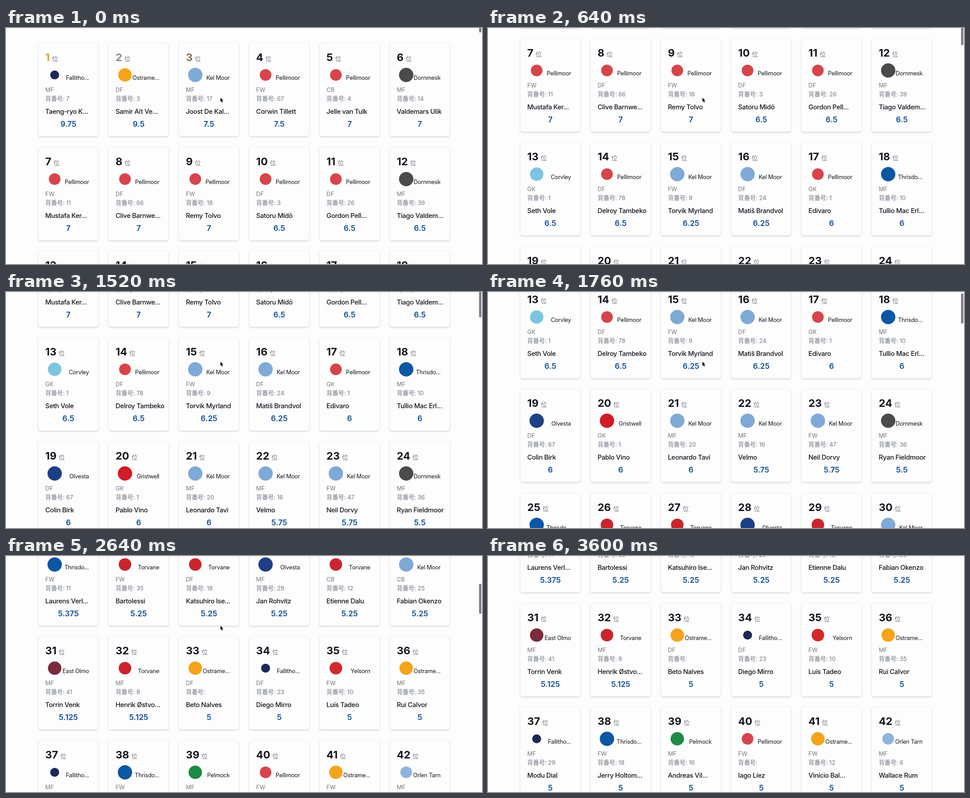
Write an HTML page with a canvas that moves like this. It is 1061 px wide and 528 px high and loops after 3.68 s.

```html
<!DOCTYPE html>
<html lang="ja">
<head>
<meta charset="utf-8">
<title>Player ranking</title>
<style>
html, body { margin: 0; width: 100%; height: 100%; overflow: hidden; background: #fdfdfd; }
canvas { display: block; }
</style>
</head>
<body>
<canvas id="stage" width="1061" height="528"></canvas>
<script>
const ctx = document.getElementById('stage').getContext('2d');
const WIDTH = 1061, HEIGHT = 528, LOOP = 3680, STEP = 80;
const FONT = 'Inter, "Noto Sans CJK JP", "Noto Sans CJK", sans-serif';
const GRAY = '#717784', INK = '#14161f', BLUE = '#245a9c';
const RANK_COLORS = ['#d3a72f', '#8c8c8c', '#8b6f5c'];
const CARD = { left: 72, top: 34, width: 133.5, height: 208, pitchX: 156.7, pitchY: 232.5 };

// key: [label, badge colour, badge radius]
const TEAMS = {
  D: ['Fallitho...', '#1b2a55', 10],
  O: ['Ostrame...', '#f5a31a', 15],
  K: ['Kel Moor', '#7fa9d6', 16],
  P: ['Pellimoor', '#d6454b', 13],
  N: ['Dornmesk', '#4b4a4c', 16],
  C: ['Corvley', '#7cc4e0', 15],
  T: ['Thrisdo...', '#0b57a4', 16],
  V: ['Olvesta', '#1d3f86', 16],
  G: ['Gristwell', '#d01c27', 16],
  A: ['Torvane', '#c9252f', 14],
  E: ['East Olmo', '#7a2b3d', 15],
  Y: ['Yelsorn', '#d22a2b', 14],
  M: ['Pelmock', '#1d8a45', 15],
  L: ['Orlen Tarn', '#8fb3dc', 13]
};

const PLAYERS = `Taeng-ryo K...|D|MF|7|9.75
Samir Aït Ve...|O|DF|3|9.5
Joost De Kal...|K|MF|17|7.5
Corwin Tillett|P|FW|67|7.5
Jelle van Tulk|P|CB|4|7
Valdemars Ulik|N|MF|14|7
Mustafa Ker...|P|FW|11|7
Clive Barnwe...|P|DF|66|7
Remy Tolvo|P|FW|18|7
Satoru Midō|P|DF|3|6.5
Gordon Pell...|P|DF|26|6.5
Tiago Valdem...|N|MF|39|6.5
Seth Vole|C|GK|1|6.5
Delroy Tambeko|P|DF|78|6.5
Torvik Myrland|K|FW|9|6.25
Matiš Brandvol|K|DF|24|6.25
Edivaro|P|GK|1|6
Tullio Mac Erl...|T|MF|10|6
Colin Birk|V|DF|67|6
Pablo Vino|G|GK|1|6
Leonardo Tavi|K|MF|20|6
Velmo|K|MF|16|5.75
Neil Dorvy|K|FW|47|5.75
Ryan Fieldmoor|N|MF|36|5.5
Laurens Verl...|T|FW|11|5.375
Bartolessi|A|FW|35|5.25
Katsuhiro Ise...|A|DF|18|5.25
Jan Rohvitz|V|MF|29|5.25
Etienne Dalu|A|CB|12|5.25
Fabian Okenzo|K|CB|25|5.25
Torrin Venk|E|MF|41|5.125
Henrik Østvo...|A|MF|8|5.125
Beto Nalves|O|DF||5
Diego Mirro|D|DF|23|5
Luís Tadeo|Y|FW|10|5
Rui Calvor|O|MF|35|5
Modu Dial|D|MF|29|5
Jerry Holtom...|T|FW|18|5
Andreas Vil...|M|MF|16|5
Iago Líez|P|FW||5
Vinício Bal...|O|FW|12|5
Wallace Rum|L|MF|6|5`.split('\n').map(line => {
  const [name, team, position, shirt, score] = line.split('|');
  return { name, team: TEAMS[team], position, shirt, score };
});

// [time, scroll offset, speed in px/ms]
const SCROLL_KEYS = [
  [0, 0, 0.4], [320, 160, 0.4], [1040, 274.5, 0.06], [1520, 397, 0.48],
  [2160, 725, 0.56], [2640, 1016.5, 0.58], [2800, 1091, 0]
];

function scrollAt(time) {
  const i = SCROLL_KEYS.findIndex(key => key[0] > time);
  if (i < 0) return SCROLL_KEYS[SCROLL_KEYS.length - 1][1];
  const [t0, y0, v0] = SCROLL_KEYS[i - 1], [t1, y1, v1] = SCROLL_KEYS[i];
  const span = t1 - t0, u = (time - t0) / span, w = 1 - u;
  return w * w * ((1 + 2 * u) * y0 + u * span * v0) +
         u * u * ((3 - 2 * u) * y1 - w * span * v1);
}

function text(value, x, y, size, color, { weight = 400, align = 'left', spacing = 0 } = {}) {
  ctx.font = `${weight} ${size}px ${FONT}`;
  ctx.letterSpacing = spacing + 'px';
  ctx.textAlign = align;
  ctx.fillStyle = color;
  ctx.fillText(value, x, y);
  return ctx.measureText(value).width;
}

function roundRect(x, y, w, h, r) {
  ctx.beginPath();
  ctx.roundRect(x, y, w, h, r);
}

function drawCard(player, index, x, y) {
  ctx.save();
  ctx.shadowColor = 'rgba(0,0,0,0.2)';
  ctx.shadowBlur = 3.5;
  ctx.shadowOffsetY = 1.5;
  ctx.fillStyle = '#fdfdfd';
  roundRect(x, y, CARD.width, CARD.height, 5);
  ctx.fill();
  ctx.restore();
  ctx.strokeStyle = '#f4f4f5';
  ctx.lineWidth = 1;
  ctx.stroke();

  const left = x + 15.5;
  const rankWidth = text(index + 1, left, y + 40.3, 23.3, RANK_COLORS[index] || INK, { weight: 700 });
  text('位', left + rankWidth + 5, y + 39.5, 13.4, GRAY);

  const [label, color, radius] = player.team;
  ctx.fillStyle = color;
  ctx.beginPath();
  ctx.arc(x + 36.5, y + 71, radius, 0, Math.PI * 2);
  ctx.fill();
  text(label, x + 113, y + 82.3, 12.8, INK, { align: 'right', spacing: -0.25 });

  text(player.position, left, y + 109, 13, GRAY);
  text('背番号: ' + player.shirt, left, y + 128.5, 13.2, GRAY, { spacing: -0.1 });
  text(player.name, left, y + 158.3, 14.7, INK, { weight: 500, spacing: -0.35 });
  text(player.score, x + 67, y + 186.5, 16.8, BLUE, { weight: 700, align: 'center' });
}

function drawScrollbar(scroll, time) {
  ctx.globalAlpha = Math.max(0, Math.min(1, (3600 - time) / 260));
  ctx.fillStyle = '#7c7c7c';
  roundRect(1054.5, 0.1175 * scroll - 57.5, 5, 67.5, 2.5);
  ctx.fill();
  ctx.globalAlpha = 1;
}

function drawCursor(x, y) {
  ctx.beginPath();
  [[0, 0], [0, 9.3], [2.1, 7.4], [3.6, 10.8], [5.2, 10.1], [3.7, 6.8], [6.4, 6.6]]
    .forEach(([dx, dy]) => ctx.lineTo(x + dx, y + dy));
  ctx.closePath();
  ctx.lineWidth = 1.4;
  ctx.strokeStyle = '#fff';
  ctx.stroke();
  ctx.fillStyle = '#000';
  ctx.fill();
}

const headerShade = ctx.createLinearGradient(0, 0, 0, 4);
headerShade.addColorStop(0, 'rgba(0,0,0,0.035)');
headerShade.addColorStop(1, 'rgba(0,0,0,0)');

function render(time) {
  const scroll = scrollAt(time);
  ctx.fillStyle = '#fdfdfd';
  ctx.fillRect(0, 0, WIDTH, HEIGHT);
  PLAYERS.forEach((player, i) => {
    const x = CARD.left + (i % 6) * CARD.pitchX;
    const y = Math.round(CARD.top + Math.floor(i / 6) * CARD.pitchY - scroll);
    if (y > -CARD.height - 10 && y < HEIGHT + 5) drawCard(player, i, x, y);
  });
  ctx.fillStyle = headerShade;
  ctx.fillRect(0, 0, WIDTH, 4);
  drawScrollbar(scroll, time);
  if (time < 3200) drawCursor(478, 156);
}

const start = performance.now();
function tick() {
  const time = (performance.now() - start) % LOOP;
  render(Math.floor(time / STEP) * STEP);
  requestAnimationFrame(tick);
}
tick();
</script>
</body>
</html>
```
